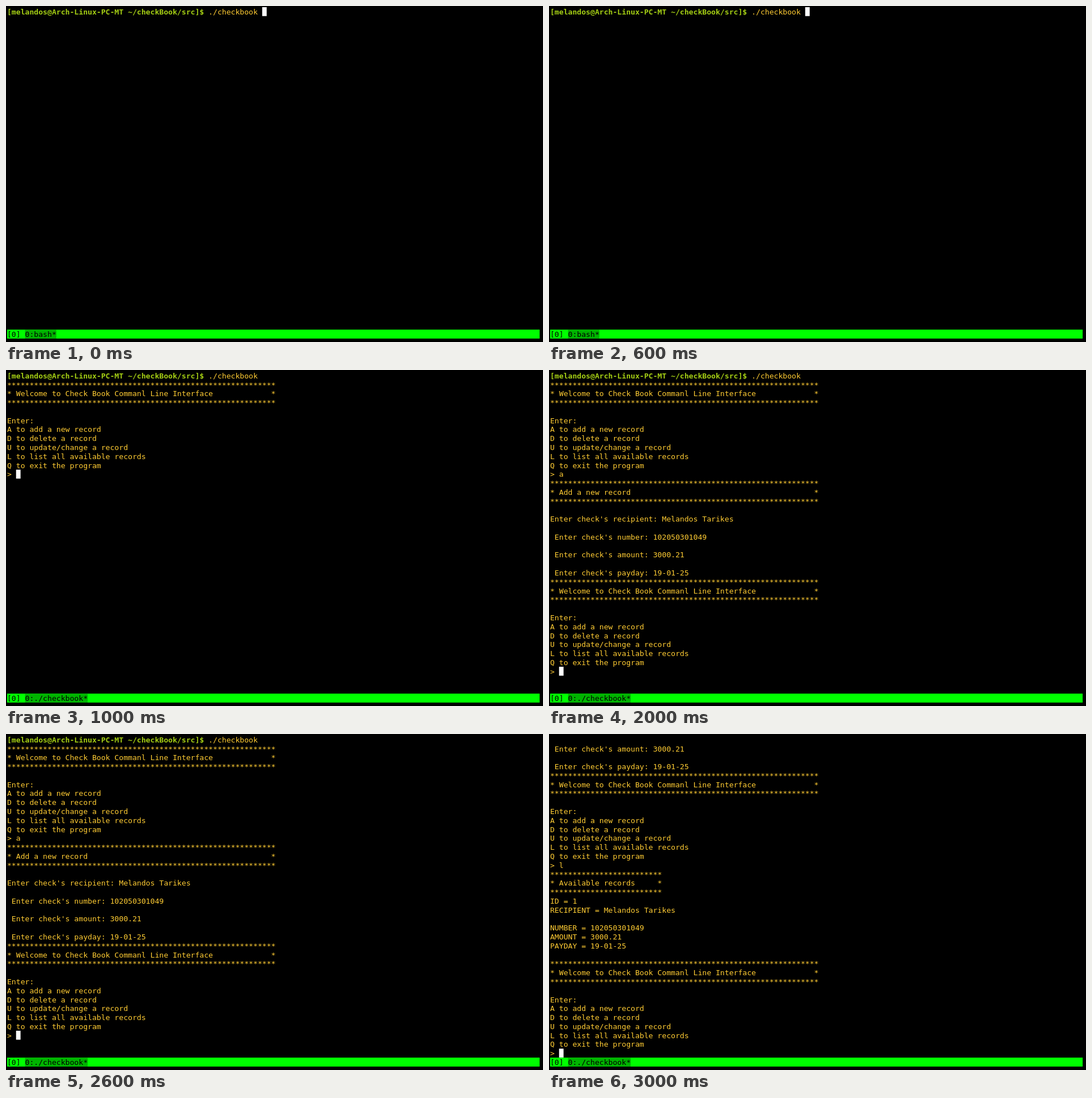
An HTML page with a canvas for the animation above (4 s loop, 947 by 592 pixels).

```html
<!DOCTYPE html>
<html lang="en">
<head>
<meta charset="utf-8">
<title>Check book</title>
<style>
html, body { margin: 0; height: 100%; overflow: hidden; background: #000; }
canvas { display: block; }
</style>
</head>
<body>
<canvas id="screen" width="947" height="592"></canvas>
<script>
const ctx = document.getElementById('screen').getContext('2d');

// Terminal grid, laid out at 960 wide and scaled to the stage
const SCALE = 947 / 960, PAD = 2, CW = 8, CH = 16, BASE = 13;
const COLS = 119, ROWS = 36;
const FONT = '13.333px "DejaVu Sans Mono", monospace';
const AMBER = '#ffcc33', LIME = '#a5cf14', GREEN = '#00ff00', TAB = '#00b400';

const PROMPT = '[melandos@Arch-Linux-PC-MT ~/checkBook/src]$ ';
const COMMAND = './checkbook ';
const NAME = 'Melandos Tarikes', NUMBER = '102050301049';
const AMOUNT = '3000.21', PAYDAY = '19-01-25';

const banner = (title, width = 60) => [
  '*'.repeat(width),
  ('* ' + title).padEnd(width - 1) + '*',
  '*'.repeat(width)
];

const menu = [
  ...banner('Welcome to Check Book Commanl Line Interface'),
  '',
  'Enter:',
  'A to add a new record',
  'D to delete a record',
  'U to update/change a record',
  'L to list all available records',
  'Q to exit the program'
];

const addRecord = [
  ...banner('Add a new record'),
  '',
  "Enter check's recipient: " + NAME,
  '',
  " Enter check's number: " + NUMBER,
  '',
  " Enter check's amount: " + AMOUNT,
  '',
  " Enter check's payday: " + PAYDAY
];

const listRecords = [
  ...banner('Available records', 25),
  'ID = 1',
  'RECIPIENT = ' + NAME,
  '',
  'NUMBER = ' + NUMBER,
  'AMOUNT = ' + AMOUNT,
  'PAYDAY = ' + PAYDAY,
  ''
];

const start = PROMPT + COMMAND;
const added = [start, ...menu, '> a', ...addRecord, ...menu];
const scenes = [
  { job: 'bash', lines: [start] },
  { job: './checkbook', lines: [start, ...menu, '> '] },
  { job: './checkbook', lines: [...added, '> '] },
  { job: './checkbook', lines: [...added, '> l', ...listRecords, ...menu, '> '] }
];

function fillCells(col, row, count, color) {
  ctx.fillStyle = color;
  ctx.fillRect(PAD + col * CW, PAD + row * CH, count * CW, CH);
}

function print(text, col, row, color, bold = false) {
  ctx.font = (bold ? 'bold ' : '') + FONT;
  ctx.fillStyle = color;
  [...text].forEach((ch, i) => {
    if (ch !== ' ') ctx.fillText(ch, PAD + (col + i) * CW, PAD + row * CH + BASE);
  });
}

function drawStatus(job) {
  const tab = '0:' + job + '*';
  fillCells(0, ROWS, COLS, GREEN);
  fillCells(4, ROWS, tab.length, TAB);
  print('[0]', 0, ROWS, '#000');
  print(tab, 4, ROWS, '#000');
}

function draw({ job, lines }) {
  ctx.setTransform(1, 0, 0, 1, 0, 0);
  ctx.fillStyle = '#000';
  ctx.fillRect(0, 0, 947, 592);
  ctx.scale(SCALE, SCALE);

  const shown = lines.slice(-ROWS);
  shown.forEach((line, row) => {
    if (line === start) {
      print(PROMPT, 0, row, LIME, true);
      print(COMMAND, PROMPT.length, row, AMBER);
    } else {
      print(line, 0, row, AMBER);
    }
  });
  const last = shown.length - 1;
  fillCells(shown[last].length, last, 1, '#fff');
  drawStatus(job);
}

const t0 = performance.now();
function tick() {
  const t = (performance.now() - t0) % 4000;
  draw(scenes[Math.floor(t / 1000)]);
  requestAnimationFrame(tick);
}
tick();
</script>
</body>
</html>
```
